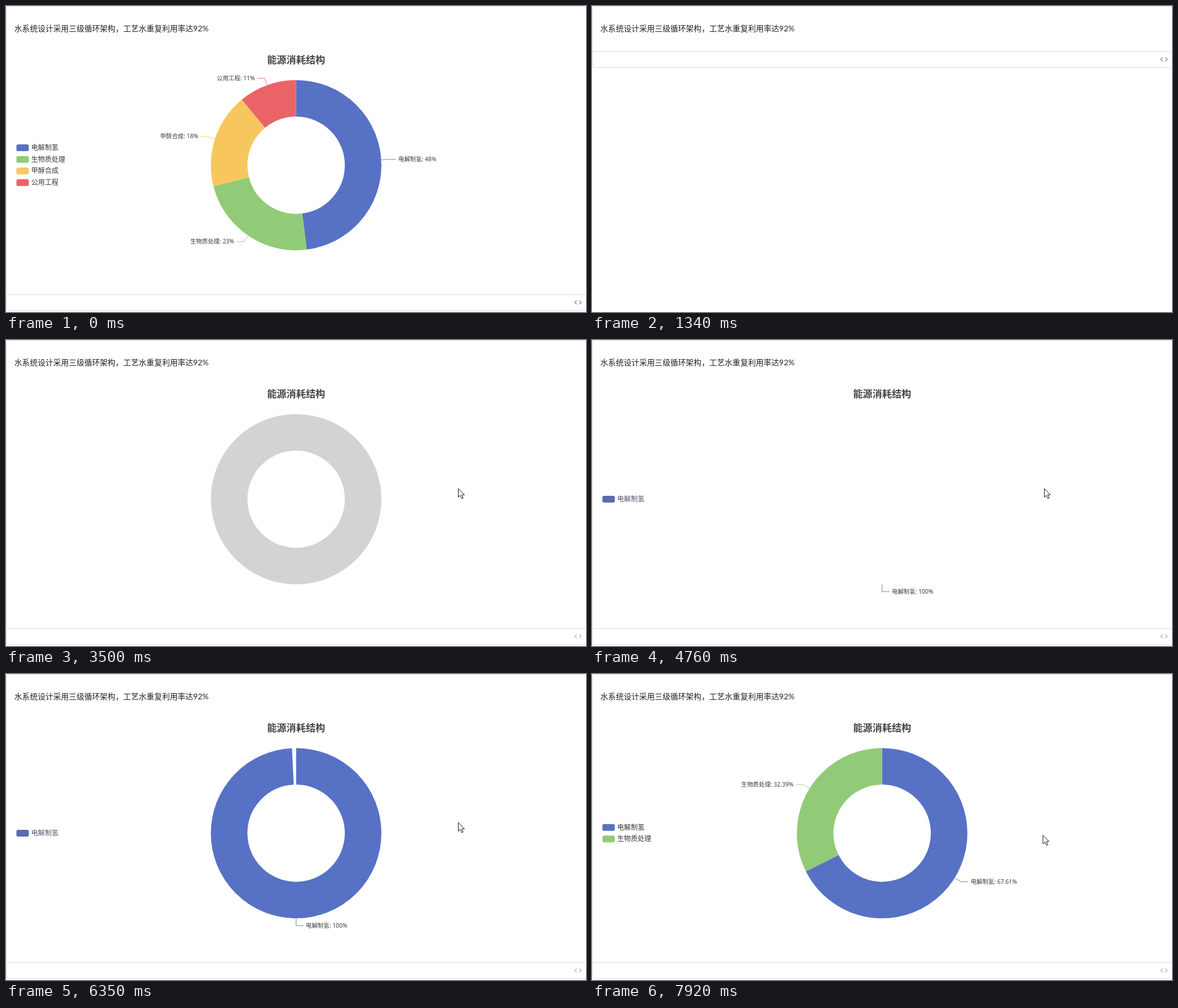
Write an HTML page that moves like this. It is 1029 by 544 pixels and loops after 7.99 s.

```html
<!DOCTYPE html>
<html lang="zh-CN">
<head>
<meta charset="utf-8">
<style>
html, body { margin: 0; height: 100%; overflow: hidden; background: #fff; }
svg { display: block; width: 1029px; height: 544px; font-family: "Noto Sans", "Noto Sans CJK SC", "Noto Sans CJK", sans-serif; }
.para { font: 13.8px Lato, "Noto Sans CJK SC", "Noto Sans CJK", sans-serif; fill: #222; }
.title { font-size: 17.2px; font-weight: 700; fill: #464646; text-anchor: middle; }
.legend { font-size: 12.1px; }
.label { font-size: 10.4px; fill: #3a3a3e; }
</style>
</head>
<body>
<svg id="stage" viewBox="0 0 1029 544"></svg>
<script>
const LOOP = 7990, CX = 514.7, CY = 283, R = 151.3, HOLE = 86.4;
const PARA = '水系统设计采用三级循环架构，工艺水重复利用率达92%';
const TITLE = '能源消耗结构';
const DATA = [
  ['电解制氢', 48, '#5771c5'],
  ['生物质处理', 23, '#92cb77'],
  ['甲醇合成', 18, '#f7c75e'],
  ['公用工程', 11, '#ea6467']
];
// start, duration and item count of each chart run
const RUNS = [[4760, 1426, 1], [5103, 1426, 1], [6644, 950, 2]];
// time, x, y of the pointer tip
const POINTER = [
  [2890, 640, -20], [3100, 694, 185], [3360, 788, 290], [3490, 802.5, 264],
  [6420, 802.5, 264], [6800, 848, 262], [7170, 800, 286.5]
];

const clamp = (v, lo, hi) => Math.min(hi, Math.max(lo, v));
const ease = x => x < 0.5 ? 4 * x ** 3 : 1 - (2 - 2 * x) ** 3 / 2;

function text(cls, x, y, str, extra = '') {
  return `<text class="${cls}" x="${x}" y="${y}" ${extra}>${str}</text>`;
}

function ring(color, start = 0, length = 100) {
  return `<circle r="${(R + HOLE) / 2}" fill="none" stroke="${color}" stroke-width="${R - HOLE}"
    pathLength="100" stroke-dasharray="${length} 200" stroke-dashoffset="${-start}"
    transform="translate(${CX} ${CY}) rotate(-90)"/>`;
}

function label(name, percent, mid, color) {
  const a = mid / 50 * Math.PI, side = Math.sin(a) >= -1e-9 ? 1 : -1;
  const at = r => [CX + r * Math.sin(a), CY - r * Math.cos(a)];
  const [x, y] = at(R + 13);
  return `<path d="M${at(R)}L${x} ${y}h${13 * side}" fill="none" stroke="${color}" stroke-width=".9"/>` +
    text('label', x + 17.4 * side, y + 3.2, `${name}: ${percent}%`, side < 0 ? 'text-anchor="end"' : '');
}

function chart(count, progress) {
  const items = DATA.slice(0, count);
  const total = items.reduce((sum, d) => sum + d[1], 0);
  const single = count === 1;
  let start = 0, out = '';
  items.forEach(([name, value, color], i) => {
    const share = value / total * 100, y = CY + (i - (count - 1) / 2) * 20.7;
    out += ring(color, start * progress, share * progress) +
      label(name, +share.toFixed(2), start + share / 2, color) +
      `<rect x="18.5" y="${y - 6}" width="22" height="12" rx="3" fill="${single ? '#5a6bae' : color}"/>` +
      text('legend', 44.7, y + 4, name, `fill="${single ? '#56586f' : '#38383a'}"`);
    start += share;
  });
  return out;
}

function card(bottom, iconColor) {
  return `<g fill="none" stroke="#dcdde5">
    <rect x=".5" y=".5" width="1040" height="${bottom - 0.5}" rx="3.5"/>
    <path d="M1 ${bottom - 28.5}H1029"/>
    <path d="M1012.5 ${bottom - 18}l-3.6 3.4 3.6 3.4m4.6-6.8l3.6 3.4-3.6 3.4" stroke="${iconColor}" stroke-width="1.2"/>
  </g>`;
}

function pointer(t) {
  let i = POINTER.findIndex(k => k[0] > t);
  if (i === 0) return '';
  if (i < 0) i = POINTER.length - 1;
  const [t0, x0, y0] = POINTER[i - 1], [t1, x1, y1] = POINTER[i];
  const p = clamp((t - t0) / (t1 - t0), 0, 1);
  return `<path d="M0 0V15.5L3.6 12.2 6.2 18 8.6 17 6.1 11.2H10.8Z" fill="#fff" stroke="#111"
    transform="translate(${x0 + (x1 - x0) * p} ${y0 + (y1 - y0) * p})"/>`;
}

function scene(t) {
  const before = t < 400, full = before || t >= 2010;
  const typed = before ? PARA.length : clamp(Math.floor((t - 470) / 860 * PARA.length), 0, PARA.length);
  if (!typed) return '';
  const bottom = full ? 541.5 : t < 1470 ? 109.5 : 148.5;
  let out = card(bottom, t < 2010 ? '#7d8694' : '#b4b4b8') + text('para', 14.8, 45.2, PARA.slice(0, typed));
  if (!full) return out;

  const shown = before ? 6 : 2 * Math.ceil((t - 2889) / 140);
  if (shown > 0) out += text('title', CX, 102.4, TITLE.slice(0, shown));

  const run = RUNS.filter(r => r[0] <= t).pop();
  if (before) out += chart(4, 1);
  else if (run) out += chart(run[2], ease(clamp((t - run[0]) / run[1], 0, 1)));
  else out += ring('#d3d3d3');
  return out + pointer(t);
}

const stage = document.getElementById('stage');
const begin = performance.now();
function draw() {
  stage.innerHTML = scene((performance.now() - begin) % LOOP);
  requestAnimationFrame(draw);
}
draw();
</script>
</body>
</html>
```
